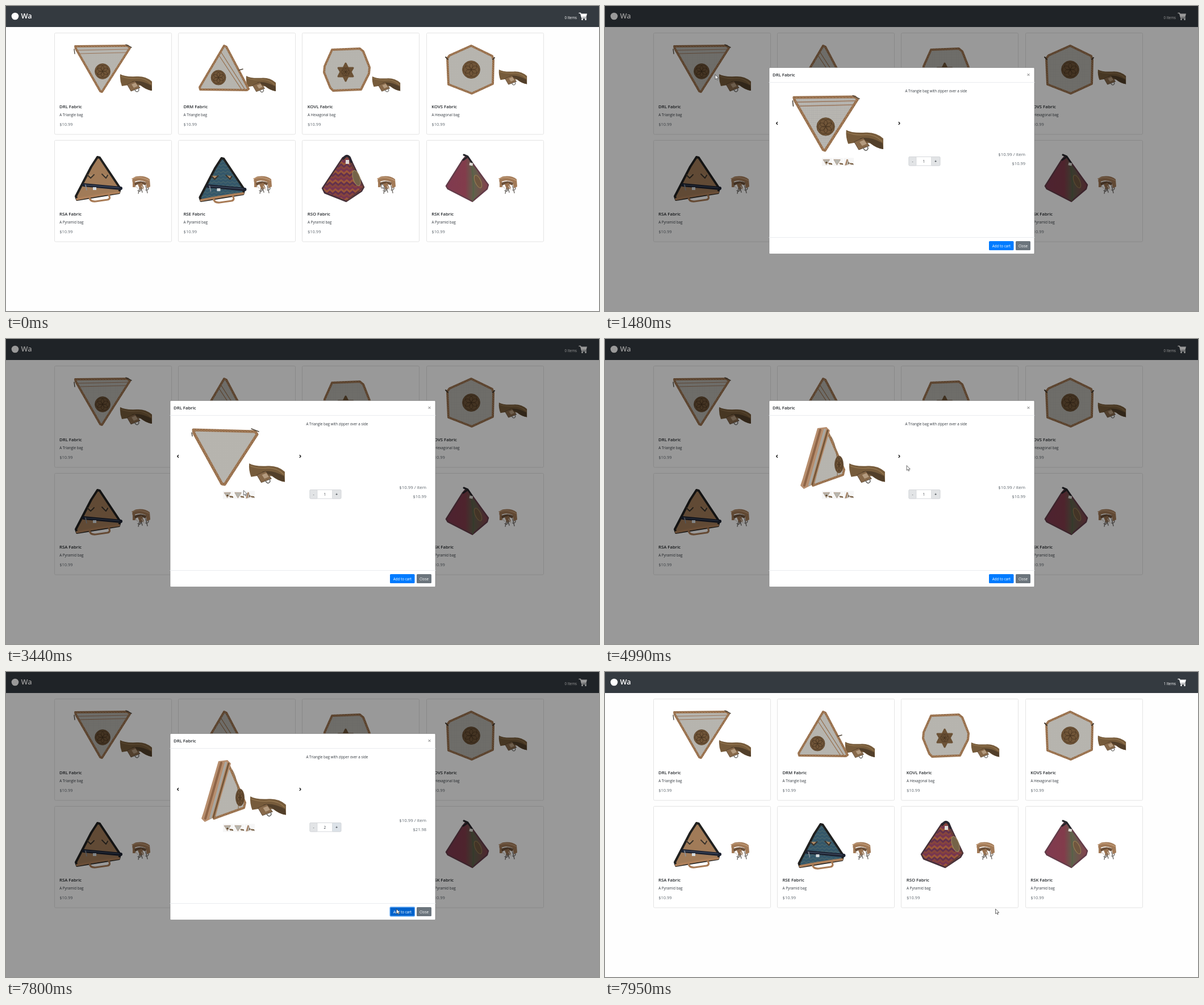
An HTML page for the animation above (8000 ms loop, 1044x537 px).

```html
<!DOCTYPE html>
<html lang="en">
<head>
<meta charset="utf-8">
<title>Bag shop</title>
<style>
html, body { margin: 0; width: 100%; height: 100%; overflow: hidden; background: #fefefe; }
svg { display: block; width: 100vw; height: 100vh; }
text { font-family: "Open Sans", "Noto Sans", sans-serif; font-size: 6.3px; fill: #343a40; white-space: pre; }
.title { font-size: 7.75px; font-weight: 600; fill: #212529; }
.price { font-size: 7.5px; fill: #5f676e; }
.end { text-anchor: end; }
.mid { text-anchor: middle; }
.light { fill: #fff; }
</style>
</head>
<body>
<svg id="stage" viewBox="0 0 1044 537"></svg>
<script>
const LOOP = 8000;
const CORK = 'url(#cork)', LINEN = 'url(#linen)';

// Drawing helpers
const poly = (points, fill, extra = '') =>
  `<polygon points="${points}" fill="${fill}" stroke-linejoin="round" ${extra}/>`;
const path = (d, fill, stroke = 'none', width = 1, extra = '') =>
  `<path d="${d}" fill="${fill}" stroke="${stroke}" stroke-width="${width}" stroke-linecap="round" stroke-linejoin="round" ${extra}/>`;
const rect = (x, y, w, h, fill, extra = '') =>
  `<rect x="${x}" y="${y}" width="${w}" height="${h}" fill="${fill}" ${extra}/>`;
const oval = (x, y, rx, ry, fill, extra = '') =>
  `<ellipse cx="${x}" cy="${y}" rx="${rx}" ry="${ry}" fill="${fill}" ${extra}/>`;
const text = (x, y, s, cls = '', extra = '') => `<text x="${x}" y="${y}" class="${cls}" ${extra}>${s}</text>`;
const place = (x, y, s, body) => `<g transform="translate(${x} ${y}) scale(${s})">${body}</g>`;
const group = (id, body) => `<g id="${id}">${body}</g>`;
const piped = (points, width = 4) => poly(points, LINEN, `stroke="${CORK}" stroke-width="${width}"`);

function medallion(x, y, rx, ry = rx) {
  let petals = '';
  for (let i = 0; i < 6; i++) {
    const a = i * Math.PI / 3;
    petals += oval(x + rx * .45 * Math.cos(a), y + ry * .45 * Math.sin(a), rx * .42, ry * .42,
      'none', 'stroke="#453320" stroke-width=".7"');
  }
  return oval(x, y, rx, ry, '#705538', 'stroke="#5c452c" stroke-width=".8"') + petals;
}

const strap = (x, y, s = 1) => place(x, y, s,
  path('M1 1Q9 6 30 5Q46 4 57 14L57 30Q47 29 37 21L16 20 4 22Q0 12 1 1Z', '#765b3b') +
  path('M21 14Q36 10 56 21L57 30Q47 29 35 19Z', '#523f2a') +
  path('M3 5Q16 10 31 8Q45 8 55 18', 'none', '#94764f', 1.2) +
  poly('13,19 27,13 36,25 20,31', '#87694a', 'stroke="#4e3b28" stroke-width=".7"') +
  path('M21 19L28 16 32 22 25 25Z', '#b39a7e') +
  path('M27 29Q31 35 34 29L33 26', 'none', '#73726f', 1.5));

const clip = (x, y) => place(x, y, 1,
  path('M3 12Q0 3 10 1Q24 -1 33 6L34 19 28 22 26 11Q16 6 7 10L8 20 3 20Z', '#a27a57') +
  path('M2 5Q16 0 32 8', 'none', '#c09a77', 1.5) +
  path('M6 12Q17 7 27 12L26 17Q15 11 7 18Z', '#6d513a') +
  poly('12,15 19,12 23,22 16,25', '#98714f') +
  path('M15 22L13 31M18 22L20 29M26 18L29 30M12 26Q16 29 18 24M26 25Q31 26 31 21', 'none', '#77736f', 1.5) +
  path('M19 18L23 25M8 18L12 22', 'none', '#d4cec7', 1.4));

// Bags
const downTriangle =
  piped('122,71 214,70 218,74 169,151 166,150 123,75') +
  path('M127 84L211 82M125 78L215 76', 'none', '#9a755a', 1.2) +
  path('M120 76L121 84M211 68L221 73', 'none', '#50473c', 1.4) +
  medallion(170, 115, 13.5) + strap(200, 119);

const plainTriangle =
  piped('330,160 439,163 442,168 385,256 380,255 331,166', 5) +
  path('M327 165L328 171M432 158L445 163', 'none', '#51483e', 1.5) + strap(427, 218, 1.12);

const sideView =
  piped('391,161 421,230 419,239 366,258', 4) +
  poly('374,157 390,155 396,161 368,255 350,264 344,258 348,246', '#b78e6e') +
  path('M379 160L351 258', 'none', '#8f6547', 4) +
  path('M387 160L360 257', 'none', '#a9a7a0', 4) +
  path('M392 161L365 256', 'none', '#765738', 3) +
  path('M398 172Q411 193 409 242', 'none', '#8c7358', 1.3) +
  medallion(412, 221, 7.5, 15) + strap(429, 218, 1.12);

const upTriangle =
  strap(422, 122, .93) + piped('384,70 388,72 427,146 424,148 342,147 341,143') +
  path('M375 87L414 146M379 82L420 146', 'none', '#95704f', 1.3) +
  path('M410 113L417 111', 'none', '#4e4337', 1.5) + medallion(374, 126, 13);

const flatHexagon =
  piped('574,77 623,75 629,80 640,108 639,119 625,147 576,149 571,144 560,117 561,106') +
  poly('598,101 602,109 611,109 607,116 611,124 602,124 598,132 594,124 585,124 589,116 585,109 594,109',
    '#705538', 'stroke="#6b5135" stroke-width="3"') +
  medallion(598, 116, 8) + strap(644, 123, .88);

const tallHexagon =
  piped('819,70 856,88 858,95 857,137 820,154 779,138 777,92 781,87') +
  path('M778 94L774 90M857 94L860 91', 'none', '#463c31', 2) +
  medallion(819, 112, 15.5) + strap(867, 111, .88);

const zipPyramid = fill =>
  poly('161,266 165,267 201,321 199,329 125,341 123,335 150,283', fill, 'stroke="#20201f" stroke-width="4"') +
  path('M137 315L202 321', 'none', '#1c2230', 6) +
  path('M138 315L199 320', 'none', '#4b5870', 1) +
  path('M143 297L149 303 155 297M169 296L176 303 179 298', '#ab8a67', '#3b332b', 2) +
  rect(153, 319, 6, 5, '#d6dcdf') + path('M140 315L142 324', 'none', '#89909b', 1.5) +
  path('M125 340Q160 333 199 328', 'none', '#ae805a', 4) +
  path('M147 337Q148 345 158 344L179 341Q185 339 181 333', 'none', '#a87b56', 3.2);

const weavePyramid =
  poly('599,264 605,266 630,319 626,326 599,344 561,329 557,321 593,267', 'url(#zigzag)', 'stroke="#45313a" stroke-width="2.5"') +
  path('M594 269Q600 260 605 267L608 275', 'none', '#292630', 4) +
  path('M606 276L629 319 600 343', 'none', '#633c36', 2) +
  rect(598, 271, 6, 7, '#dedad6') +
  oval(617, 303, 6, 14, '#756348', 'stroke="#a28d64" stroke-width="1" transform="rotate(-18 617 303)"') + clip(652, 299);

const roundPyramid =
  poly('810,264 815,268 849,315 847,322 821,344 778,322 775,317 804,271', 'url(#rose)', 'stroke="#633c49" stroke-width="2.5"') +
  path('M806 262L813 265 821 277M805 271L812 266', 'none', '#25252a', 3) +
  path('M819 279Q825 311 822 343', 'none', '#586147', 2) +
  rect(816, 276, 6, 5, '#dedbd5', 'transform="rotate(12 819 278)"') +
  oval(831, 309, 5, 12, '#70563f', 'stroke="#998154" stroke-width="1" transform="rotate(-24 831 309)"') + clip(866, 299);

// Page
const products = ['DRL', 'DRM', 'KOVL', 'KOVS', 'RSA', 'RSE', 'RSO', 'RSK'];
const kinds = ['Triangle', 'Triangle', 'Hexagonal', 'Hexagonal'];
const cards = products.map((name, i) => {
  const x = 85.5 + i % 4 * 218.4, y = i < 4 ? 47.5 : 236.5;
  return rect(Math.round(x) - .5, y, 206, 178.5, '#fff', 'rx="2" stroke="#e4e4e4"') +
    text(x + 8.5, y + 132.3, name + ' Fabric', 'title') +
    text(x + 8.7, y + 146.2, `A ${kinds[i] || 'Pyramid'} bag`) +
    text(x + 8.7, y + 163.5, '$10.99', 'price', 'font-weight="500"');
}).join('');

const cart =
  path('M1009 12.5H1011.5L1014 21H1021.5', 'none', '#fff', 1.5) +
  poly('1011.5,13.5 1023,13.5 1021.5,19.5 1013,19.5', '#fff') +
  oval(1014.5, 23.5, 1.5, 1.5, '#fff') + oval(1020.5, 23.5, 1.5, 1.5, '#fff');

const page = rect(0, 0, 1044, 537, '#fefefe') + rect(0, 0, 1044, 37, '#343a40') +
  oval(16, 18, 6.3, 6.3, '#fff') +
  text(26.5, 22, 'Wa', 'light', 'style="font-size:12.7px;font-weight:600"') +
  text(1005, 22.8, '0 Items', 'light end', 'id="count"') + cart + cards +
  downTriangle + upTriangle + flatHexagon + tallHexagon +
  zipPyramid('#a17b58') + clip(220, 299) +
  place(218.4, 2, 1, zipPyramid('url(#teal)')) + clip(434, 299) + weavePyramid + roundPyramid;

// Dialog
const front = place(190.5, 78.4, 1.165, downTriangle);
const views = [front, plainTriangle, sideView];
const thumbs = views.map((v, i) =>
  rect(382 + i * 19, 267.5, 18, 14, '#f6f6f6') +
  place([351, 370, 388][i], 254.3, .1, v)).join('');

const dialog = rect(0, 0, 1044, 537, '#000', 'opacity=".4"') +
  rect(289, 108.5, 467, 328, '#fff', 'rx="1.5" stroke="#777" stroke-width=".6"') +
  path('M289 134.5H756M289 407.5H756', 'none', '#e9ecef') +
  text(295, 124.2, 'DRL Fabric', 'title') +
  path('M743.8 119.3L747.2 122.7M747.2 119.3L743.8 122.7', 'none', '#777', 1) +
  path('M303.5 204.5L301.7 206.5 303.5 208.5M517.2 204.5L519 206.5 517.2 208.5', 'none', '#111', 1.3) +
  views.map((v, i) => group('view' + i, v)).join('') + thumbs +
  text(528.5, 151.7, 'A Triangle bag with zipper over a side') +
  text(740, 264, '$10.99 / item', 'price end', 'style="font-size:7.8px"') +
  text(740, 279.5, '$10.99', 'price end', 'id="total"') +
  rect(535, 265.5, 55, 15.5, '#fff', 'rx="1.5" stroke="#d5d8db"') +
  rect(535, 265.5, 13, 15.5, '#e2e4e6', 'rx="1" stroke="#ced2d6" stroke-width=".6"') +
  rect(574.5, 265.5, 15, 15.5, '#e2e4e6', 'id="plus" rx="1" stroke="#ced2d6" stroke-width=".6"') +
  text(541.5, 275.5, '-', 'mid') + text(582, 275.7, '+', 'mid', 'style="font-weight:700"') +
  text(561.3, 275.7, '1', 'mid', 'id="quantity"') +
  rect(676, 414, 43.5, 16, '#007bff', 'id="add" rx="1.5"') +
  rect(723, 414, 26, 16, '#6c757d', 'rx="1.5"') +
  text(697.8, 424.5, 'Add to cart', 'light mid') + text(736, 424.5, 'Close', 'light mid');

const pointer = oval(0, 0, 4.5, 4.5, '#ebe51c', 'id="press" opacity=".85"') +
  path('M0 0V8.2L2 6.5 3.4 9.4 4.7 8.8 3.4 6H5.8Z', '#fff', '#444', .8);

const pattern = (id, w, h, body) =>
  `<pattern id="${id}" width="${w}" height="${h}" patternUnits="userSpaceOnUse">${body}</pattern>`;
const chevrons = (colours, h) => colours.map((c, i) =>
  path(`M-2 ${i * h - 2}L5 ${i * h + 4} 12 ${i * h - 2}`, 'none', c, h + .5)).join('');
const defs = '<defs>' +
  pattern('linen', 3, 3, rect(0, 0, 3, 3, '#bbb9b3') + path('M0 1H3M1 0V3', 'none', '#aaa9a4', .5)) +
  pattern('cork', 5, 4, rect(0, 0, 5, 4, '#a27a56') + path('M1 1L2 2M4 2L3 4', 'none', '#765437', .8)) +
  pattern('zigzag', 10, 16, rect(0, 0, 10, 16, '#69314c') +
    chevrons(['#783650', '#9b5738', '#63314c', '#87453c', '#783650'], 4)) +
  pattern('teal', 8, 6, rect(0, 0, 8, 6, '#34576a') + path('M0 4L4 1 8 4', 'none', '#536d6b', 1)) +
  `<linearGradient id="rose"><stop stop-color="#803a50"/><stop offset=".45" stop-color="#823c4b"/>
   <stop offset=".65" stop-color="#60614c"/><stop offset="1" stop-color="#86404e"/></linearGradient></defs>`;

const stage = document.getElementById('stage');
stage.innerHTML = defs + page + group('dialog', dialog) + group('pointer', pointer);
const el = id => document.getElementById(id);
const show = (id, on) => el(id).style.display = on ? '' : 'none';
const attrs = (id, values) => { for (const k in values) el(id).setAttribute(k, values[k]); };

// Pointer moves: start, end, x, y
const smooth = u => u * u * (3 - 2 * u);
const easeOut = u => 1 - (1 - u) ** 2;
const moves = [
  [300, 1280, 194, 121], [1800, 2580, 412, 270.5],
  [3380, 3830, 538, 200], [3830, 3980, 514.5, 204.5],
  [4915, 5150, 582, 280], [5240, 5390, 581.5, 272],
  [6475, 6550, 592.5, 282.5], [6550, 7260, 686, 411, easeOut],
  [7430, 7570, 687.5, 417.5]
];
const presses = [[1340, 1480], [2810, 2970], [4220, 4380], [5460, 5610], [7650, 7795]];

function pointerAt(t) {
  let x = 661, y = 313;
  for (const [start, end, toX, toY, ease = smooth] of moves) {
    if (t <= start) break;
    const k = ease(Math.min(1, (t - start) / (end - start)));
    x += (toX - x) * k;
    y += (toY - y) * k;
  }
  return [x, y];
}

function draw(now) {
  const t = now % LOOP;
  const bought = t >= 7870, two = t >= 5610;
  const focusPlus = two && t < 7650, focusAdd = t >= 7650;
  const view = t < 2970 ? 0 : t < 4300 ? 1 : 2;
  show('dialog', t >= 1480 && !bought);
  for (let i = 0; i < 3; i++) show('view' + i, i === view);
  el('count').textContent = bought ? '1 Items' : '0 Items';
  el('quantity').textContent = two ? '2' : '1';
  el('total').textContent = two ? '$21.98' : '$10.99';
  attrs('plus', {
    fill: t >= 5310 ? '#dce2e8' : '#e2e4e6',
    stroke: focusPlus ? '#83b9f3' : '#ced2d6',
    'stroke-width': focusPlus ? 1.5 : .6
  });
  attrs('add', {
    fill: t >= 7500 ? '#0062cc' : '#007bff',
    stroke: focusAdd ? '#64aaf5' : 'none',
    'stroke-width': 1.3
  });
  show('press', presses.some(([start, end]) => t >= start && t < end));
  attrs('pointer', { transform: `translate(${pointerAt(t)})` });
}

const began = performance.now();
function tick() {
  draw(performance.now() - began);
  requestAnimationFrame(tick);
}
tick();
</script>
</body>
</html>
```
